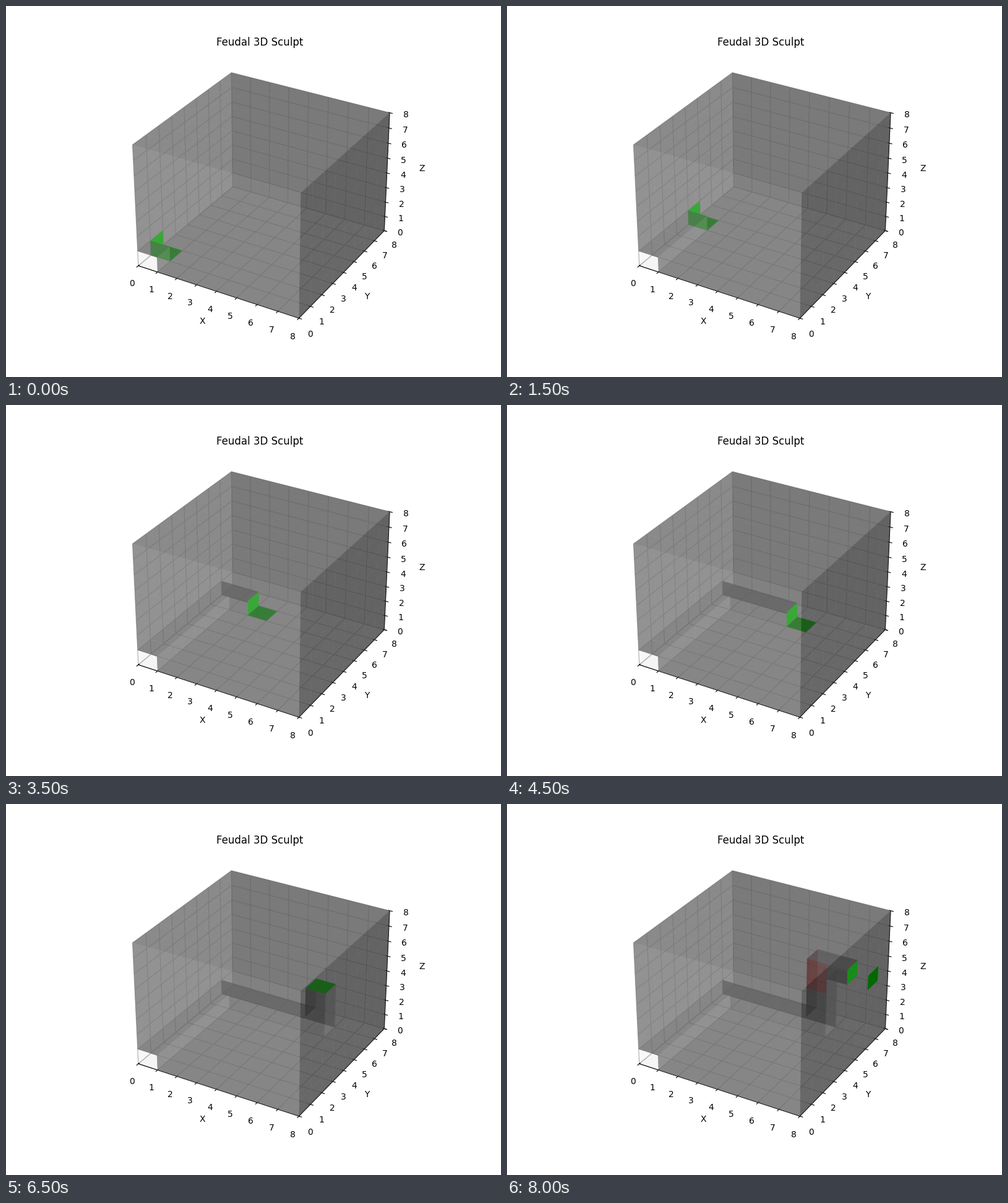
Recreate the animation shown at these times as a matplotlib script. Size 800 by 600 pixels, loop 9 s.

```python
import matplotlib.pyplot as plt
import numpy as np
from matplotlib.animation import FuncAnimation

SIZE = 8
GRAY, RED, GREEN = "#80808080", "#ff000080", "#00ff00ff"
RED_CELLS = [(4, 6, 3), (4, 6, 4), (5, 5, 3), (5, 5, 4)]

# The carver moves along y, then x, then up, then out along x.
path = [(0, y, 0) for y in range(7)]
path += [(x, 6, 0) for x in range(1, 6)]
path += [(5, 6, z) for z in range(1, 5)]
path += [(6, 6, 4), (7, 6, 4)]

fig = plt.figure(figsize=(8, 6), dpi=100)
ax = fig.add_subplot(projection="3d")


def draw(frame):
    step = min(frame + 1, len(path) - 1)
    filled = np.ones((SIZE,) * 3, dtype=bool)
    for cell in path[:step]:
        filled[cell] = False

    colors = np.full(filled.shape, GRAY)
    for cell in RED_CELLS:
        colors[cell] = RED
    colors[path[step]] = GREEN

    ax.clear()
    ax.voxels(filled, facecolors=colors)
    ax.set(xlim=(0, SIZE), ylim=(0, SIZE), zlim=(0, SIZE),
           xlabel="X", ylabel="Y", zlabel="Z", title="Feudal 3D Sculpt")
    return []


anim = FuncAnimation(fig, draw, frames=18, interval=500, repeat=True,
                     init_func=lambda: [], cache_frame_data=False)
plt.show()
```
